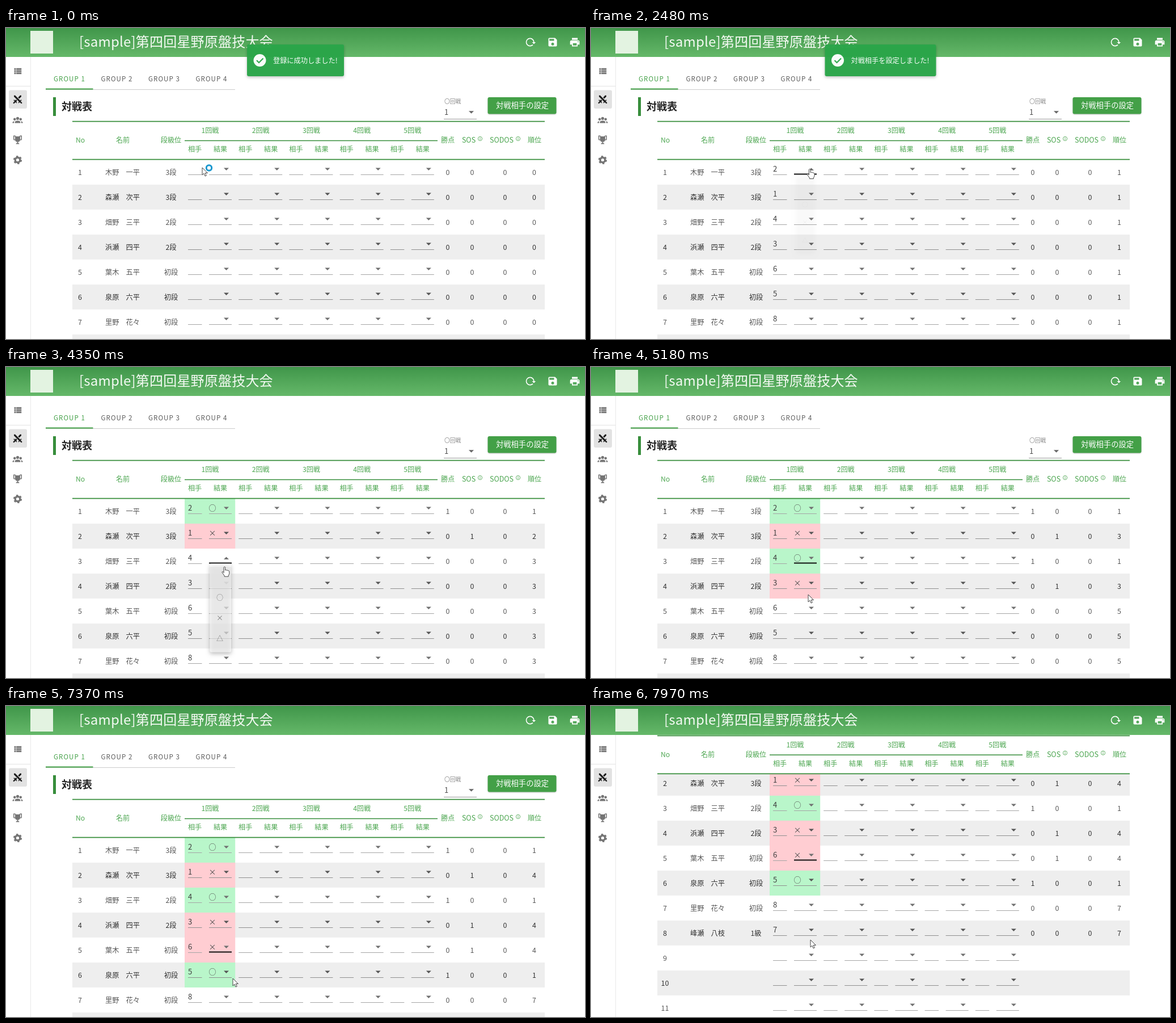
Write an HTML page with a canvas that moves like this. It is 1021x548 px and loops after 8 s.

```html
<!DOCTYPE html>
<html lang="ja">
<head>
<meta charset="utf-8">
<title>対戦表</title>
<style>
  html, body { margin: 0; width: 100%; height: 100%; overflow: hidden; background: #fff; }
  canvas { display: block; }
</style>
</head>
<body>
<canvas id="stage" width="1021" height="548"></canvas>
<script>
const c = document.getElementById('stage').getContext('2d');
const FONT = '"Noto Sans CJK JP", "Noto Sans CJK", sans-serif';
const LOOP = 8000, GREEN = '#43a047', DEEP = '#388e3c';
const ROW = 44, COL = 89.2, FIRST = 232;

const players = [
  ['木野　一平', '3段'], ['森瀬　次平', '3段'], ['畑野　三平', '2段'], ['浜瀬　四平', '2段'],
  ['葉木　五平', '初段'], ['泉原　六平', '初段'], ['里野　花々', '初段'], ['峰瀬　八枝', '1級'],
];
const OPTIONS = ['', '○', '×', '△'];
const PAIRED = 1230;
const picks = [
  { row: 0, open: 2450, click: 3350, set: 3480, close: 3600, option: 1 },
  { row: 2, open: 4220, click: 4720, set: 4850, close: 4950, option: 1 },
  { row: 4, open: 5800, click: 6600, set: 6750, close: 6850, option: 2, above: true },
];
const toasts = [
  { text: '登録に成功しました!', x: 425, w: 171, from: -1000, to: 560 },
  { text: '対戦相手を設定しました!', x: 412.5, w: 196, from: 1217, to: 4080 },
];
const pointer = [
  [0, 346, 246], [40, 346, 246], [140, 550, 206], [250, 550, 206], [350, 827, 168], [480, 827, 168],
  [800, 881, 140], [1150, 881, 140], [1360, 629, 212], [1600, 291, 250], [1950, 308, 240],
  [2080, 308, 240], [2300, 384, 245], [2500, 386, 249], [2700, 410, 300], [2880, 388, 321],
  [3600, 388, 321], [3850, 386, 326], [4080, 386, 337], [4280, 386, 338], [4600, 384, 402],
  [5000, 384, 402], [5180, 383, 401], [5480, 384, 400], [5700, 384, 427], [5860, 384, 427],
  [6280, 380, 353], [6370, 379, 353], [6880, 379, 353], [7350, 400, 480], [7430, 400, 480],
  [7570, 393, 450], [7690, 393, 450], [7970, 387, 412], [8000, 387, 412],
];
const wheel = [[0, 0], [7400, 0], [7570, 81], [7690, 81], [7960, 162], [8000, 162]];
const handTimes = [[780, 1180], [2300, 3680], [4040, 5060], [5640, 6960]];

const icons = {
  list: 'M4 14h4v-4H4zm0 5h4v-4H4zM4 9h4V5H4zm5 5h12v-4H9zm0 5h12v-4H9zM9 5v4h12V5z',
  swords: 'M6.2 2.4l11.9 11.9 2.1-2.1 1.4 1.4-2.4 2.5 3.1 3.2q.7.7 0 1.4l-.7.7q-.7.7-1.4 0L17 18.2l-2.4 2.5-1.4-1.4 2.1-2.1L3.4 5.3V2.4z' +
    'M15.9 10l4.7-4.7V2.4h-2.8l-4.7 4.8zM10.9 15l-2.8-2.9-2.2 2.2-2.1-2.1-1.4 1.4 2.4 2.5-3.1 3.2q-.7.7 0 1.4l.7.7q.7.7 1.4 0L7 18.2l2.4 2.5 1.4-1.4-2.1-2.1z',
  people: 'M12 5.5a3.5 3.5 0 1 1 0 7 3.5 3.5 0 0 1 0-7M5 8a3 3 0 1 1 0 6 3 3 0 0 1 0-6M19 8a3 3 0 1 1 0 6 3 3 0 0 1 0-6' +
    'M5.5 20v-1.8c0-5 13-5 13 0V20zM0 20v-1.5c0-1.4 1.9-2.6 4.5-2.9-.7.8-1 1.7-1 2.7V20zM24 20v-1.5c0-1.4-1.9-2.6-4.5-2.9.7.8 1 1.7 1 2.7V20z',
  trophy: 'M18 2c-.9 0-2 1-2 2H8c0-1-1.1-2-2-2H2v9c0 1 1 2 2 2h2.2c.4 2 1.7 3.7 4.8 4v2.1C8 19.5 8 22 8 22h8s0-2.5-3-2.9V17' +
    'c3.1-.3 4.4-2 4.8-4H20c1 0 2-1 2-2V2zM6 11H4V4h2zm14 0h-2V4h2z',
  reload: 'M2 12a9 9 0 0 0 9 9c2.4 0 4.7-.9 6.4-2.6l-1.5-1.5A6.7 6.7 0 0 1 11 19c-6.2 0-9.4-7.5-5-12C10.5 2.6 18 5.8 18 12h-3l4 4h.1l3.9-4h-3a9 9 0 0 0-18 0z',
  save: 'M15 9H5V5h10zM12 19a3 3 0 1 1 0-6 3 3 0 0 1 0 6M17 3H5c-1.1 0-2 .9-2 2v14a2 2 0 0 0 2 2h14a2 2 0 0 0 2-2V7z',
  print: 'M18 3H6v4h12zM19 12a1 1 0 1 1 0-2 1 1 0 0 1 0 2M16 19H8v-5h8zM19 8H5a3 3 0 0 0-3 3v6h4v4h12v-4h4v-6a3 3 0 0 0-3-3z',
};
const arrow = new Path2D('M0 0v13l3-2.7 2.1 4.7 2.2-1-2.1-4.5h4.2z');
const hand = new Path2D('M-1.5 1c0-1.5 2.6-1.5 2.6 0v5c.5-1 2.4-.8 2.5.3.6-.8 2.3-.5 2.4.6.7-.6 2.2-.1 2.2 1.1v4.2l-1.6 3.3v1.5h-7v-1.5L-4.4 10c-.6-1.4.8-2.2 1.7-1.2l1.2 1.5z');

const clamp = v => Math.max(0, Math.min(1, v));
const smooth = v => (v = clamp(v), v * v * (3 - 2 * v));

function along(keys, t) {
  const i = Math.max(1, keys.findIndex(k => k[0] > t));
  const a = keys[i - 1], b = keys[i], p = (t - a[0]) / (b[0] - a[0]);
  return a.slice(1).map((v, n) => v + (b[n + 1] - v) * p);
}

function rect(x, y, w, h, color, radius = 0) {
  c.fillStyle = color;
  c.beginPath();
  c.roundRect(x, y, w, h, radius);
  c.fill();
}

function disc(x, y, r, color) {
  c.fillStyle = color;
  c.beginPath();
  c.arc(x, y, r, 0, 7);
  c.fill();
}

function line(color, width, ...points) {
  c.strokeStyle = color;
  c.lineWidth = width;
  c.beginPath();
  for (let i = 0; i < points.length; i += 2) c.lineTo(points[i], points[i + 1]);
  c.stroke();
}

function ring(x, y, r, color, width, dash = []) {
  c.strokeStyle = color;
  c.lineWidth = width;
  c.setLineDash(dash);
  c.beginPath();
  c.arc(x, y, r, 0, Math.PI * 2);
  c.stroke();
  c.setLineDash([]);
}

// y is the optical middle of the line of text
function text(s, x, y, size, color, align = 'center', weight = 400, spacing = 0) {
  c.font = `${weight} ${size}px ${FONT}`;
  c.letterSpacing = spacing + 'px';
  c.textAlign = align;
  c.fillStyle = color;
  c.fillText(s, x, y + size * .37);
}

function icon(name, x, y, size, color) {
  c.save();
  c.translate(x - size / 2, y - size / 2);
  c.scale(size / 24, size / 24);
  c.fillStyle = color;
  c.fill(new Path2D(icons[name]), 'evenodd');
  c.restore();
}

function caret(x, y, color, up) {
  const d = up ? -2.2 : 2.2;
  c.fillStyle = color;
  c.beginPath();
  c.moveTo(x - 4.5, y - d);
  c.lineTo(x + 4.5, y - d);
  c.lineTo(x, y + d);
  c.fill();
}

function shadow(blur, y, alpha) {
  c.shadowColor = `rgba(0,0,0,${alpha})`;
  c.shadowBlur = blur;
  c.shadowOffsetY = y;
}

function ripple(x, y, w, h, cx, cy, r, color) {
  c.save();
  c.beginPath();
  c.roundRect(x, y, w, h, 3);
  c.clip();
  disc(cx, cy, r, color);
  c.restore();
}

function standings(t) {
  const marks = players.map(() => '');
  for (const p of picks) if (t >= p.set) {
    marks[p.row] = OPTIONS[p.option];
    marks[p.row ^ 1] = OPTIONS[3 - p.option];
  }
  const wins = marks.map(m => m === '○' ? 1 : 0);
  const sos = wins.map((_, i) => wins[i ^ 1]);
  const score = wins.map((w, i) => w * 10 + sos[i]);
  const rank = score.map(s => t < PAIRED ? 0 : 1 + score.filter(o => o > s).length);
  return { marks, wins, sos, rank };
}

function drawTop(t) {
  for (let i = 0; i < 4; i++)
    text('GROUP ' + (i + 1), 84 + i * 83.5, 89.5, 11.5, i ? '#5a5a5a' : GREEN, 'left', 400, 1.1);
  rect(70, 108, 334, 1, '#ccc');
  rect(70, 106.5, 83.5, 2, GREEN);
  rect(83, 122, 5, 33, DEEP);
  text('対戦表', 98, 138, 18, '#222', 'left', 700);

  text('〇回戦', 773, 129.5, 9.8, '#8c8c8c', 'left');
  text('1', 773, 148, 13, '#4a4a4a', 'left');
  caret(820.5, 148.5, '#666');
  rect(772, 160, 58, 1, '#999');

  c.save();
  shadow(2, 1, .22);
  rect(849.5, 122, 121, 29.5, GREEN, 3);
  c.restore();
  const age = t - 1160;
  if (age > 0 && age < 700)
    ripple(849.5, 122, 121, 29.5, 881, 141, 88 * age / 200, `rgba(255,255,255,${.27 * clamp((700 - age) / 300)})`);
  text('対戦相手の設定', 910.5, 136.5, 13.3, '#fff', 'center', 500);
}

function drawHead(y) {
  rect(117, y - 1, 833, 68, '#fff');
  const label = (s, x, dy) => text(s, x, y + dy, 12.1, '#4ca650');
  [['No', 131], ['名前', 206], ['段級位', 291], ['勝点', 779], ['順位', 932]].forEach(([s, x]) => label(s, x, 32.8));
  for (let k = 0; k < 5; k++) {
    label(k + 1 + '回戦', 360 + COL * k, 16.3);
    label('相手', 333 + COL * k, 49.3);
    label('結果', 378 + COL * k, 49.3);
  }
  for (const [s, x, ix] of [['SOS', 816, 836], ['SODOS', 874, 903]]) {
    text(s, x, y + 32.8, 12.5, '#4ca650');
    ring(ix, y + 30.3, 3.6, GREEN, .8);
    line(GREEN, .9, ix, y + 29.8, ix, y + 32.3);
    disc(ix, y + 28.5, .55, GREEN);
  }
  rect(117, y - .9, 833, 1.8, DEEP);
  rect(315, y + 33, 446, 1.6, DEEP);
  rect(117, y + 66, 833, 1.8, DEEP);
}

function drawRows(t) {
  const s = standings(t);
  const active = picks.filter(p => t >= p.open - 60).pop();
  for (let i = 0; i < 12; i++) {
    const top = FIRST + ROW * i, mid = top + 22, even = i % 2;
    const ink = even ? '#303030' : '#565656', rule = even ? '#8f8f8f' : '#a5a5a5';
    const mark = s.marks[i], p = players[i];
    if (even) rect(117, top, 833, ROW, '#eee');
    if (mark) rect(315, top, COL, ROW, mark === '○' ? '#b9f6ca' : '#ffcdd2');
    text(String(i + 1), 130.5, mid, 12.4, ink);
    for (let k = 0; k < 5; k++) {
      const x = COL * k, focus = !k && active && active.row === i;
      rect(321 + x, mid + 4, 24.5, 1, rule);
      if (focus) rect(358, mid + 2.5, 40, 2, '#111');
      else rect(358 + x, mid + 4, 40, 1, rule);
      caret(388.5 + x, mid - 5.2, even ? '#555' : '#707070', focus && t < active.close);
    }
    if (!p) continue;
    text(p[0], 205.5, mid, 12.2, ink);
    text(p[1], 291, mid, 12.2, ink);
    if (t >= PAIRED) text(String((i ^ 1) + 1), 321, mid - 5.5, 13, '#3c3c3c', 'left');
    if (mark) text(mark, 364, mid - 5.5, 13, '#4a4a4a');
    [[779, s.wins], [822, s.sos], [880, null], [931.5, s.rank]]
      .forEach(([x, v]) => text(String(v ? v[i] : 0), x, mid, 12.4, ink));
  }
}

function drawMenu(p, t, [px, py]) {
  const shown = smooth((t - p.open) / 220) * (1 - smooth((t - p.close) / 160));
  if (shown <= 0) return;
  const base = FIRST + ROW * p.row, top = p.above ? base - 162 : base + 26.5;
  const origin = p.above ? top + 168 : top;
  c.save();
  c.globalAlpha = shown;
  if (t < p.close) {
    c.translate(378, origin);
    c.scale(.8 + .2 * shown, .8 + .2 * shown);
    c.translate(-378, -origin);
  }
  c.save();
  shadow(7, 3, .4);
  rect(358, top, 40.5, 168, '#fff', 3);
  c.restore();
  OPTIONS.forEach((o, i) => {
    const y = top + 6 + 39 * i;
    const hover = px > 357 && px < 399 && py >= y && py < y + 39;
    if (!i || hover) rect(358, y, 40.5, 39, i ? '#ebebeb' : '#e1e1e1');
    if (i === p.option && t > p.click)
      ripple(358, y, 40.5, 39, 378, y + 19.5, 28 * clamp((t - p.click) / 250), '#bfbfbf');
    text(o, 377, y + 19.5, 13, '#3c3c3c');
  });
  c.restore();
}

function drawSidebar() {
  rect(0, 51, 43, 497, '#fff');
  rect(43, 51, 1, 497, '#e8e8e8');
  rect(0, 102, 43, 1, '#e4e4e4');
  rect(5, 109.5, 32, 32.5, '#e2e2e2', 3);
  icon('list', 20.5, 76, 18, '#757575');
  icon('swords', 20.5, 126, 18, '#1c1c1c');
  icon('people', 20.5, 161.5, 18, '#757575');
  icon('trophy', 20.5, 197, 18, '#757575');
  ring(20.5, 232.5, 4.3, '#757575', 3.4);
  ring(20.5, 232.5, 6.3, '#757575', 2.6, [3.3, 3.3]);
}

function drawBar() {
  const g = c.createLinearGradient(0, 0, 0, 51);
  g.addColorStop(0, '#40964a');
  g.addColorStop(1, '#65b869');
  rect(0, 0, 1021, 51, g);
  rect(43, 5, 40, 40, '#e3f3e1');
  text('[sample]第四回星野原盤技大会', 129, 24, 24, '#f4faf3', 'left', 300, .2);
  icon('reload', 925, 25, 20, '#fff');
  icon('save', 964, 25, 20, '#fff');
  icon('print', 1003, 25, 20, '#fff');
}

function drawToast(n, t) {
  const enter = smooth((t - n.from) / 200), leave = smooth((t - n.to) / 250);
  const alpha = Math.min(1, enter * 1.15) * (1 - leave);
  if (alpha <= 0) return;
  const y = 29 - 45 * (1 - enter) - 4 * leave;
  c.save();
  c.globalAlpha = alpha * .97;
  c.save();
  shadow(5, 2, .25);
  rect(n.x, y, n.w, 56, '#2ba74a', 3);
  c.restore();
  disc(n.x + 22.5, y + 28, 11, '#fff');
  line('#2ba74a', 2.2, n.x + 17, y + 28, n.x + 21, y + 32, n.x + 28.5, y + 24.5);
  text(n.text, n.x + 46, y + 28, 12.2, '#fff', 'left');
  c.restore();
}

function drawPointer(t, [x, y]) {
  const shape = handTimes.some(([a, b]) => t >= a && t < b) ? hand : arrow;
  c.save();
  c.translate(x, y);
  c.fillStyle = '#fff';
  c.strokeStyle = '#444';
  c.lineWidth = 1;
  c.fill(shape);
  c.stroke(shape);
  c.restore();
  if (t < 70) ring(x + 12, y + .5, 4.7, '#1b98cf', 3);
}

function draw(t) {
  const scroll = along(wheel, t)[0], at = along(pointer, t);
  rect(0, 0, 1021, 548, '#fff');
  c.save();
  c.translate(0, -scroll);
  drawTop(t);
  drawRows(t);
  c.restore();
  drawHead(Math.max(164.7 - scroll, 52.4));
  picks.forEach(p => drawMenu(p, t, at));
  drawSidebar();
  drawBar();
  toasts.forEach(n => drawToast(n, t));
  drawPointer(t, at);
}

const start = performance.now();
function tick() {
  draw((performance.now() - start) % LOOP);
  requestAnimationFrame(tick);
}
tick();
</script>
</body>
</html>
```
